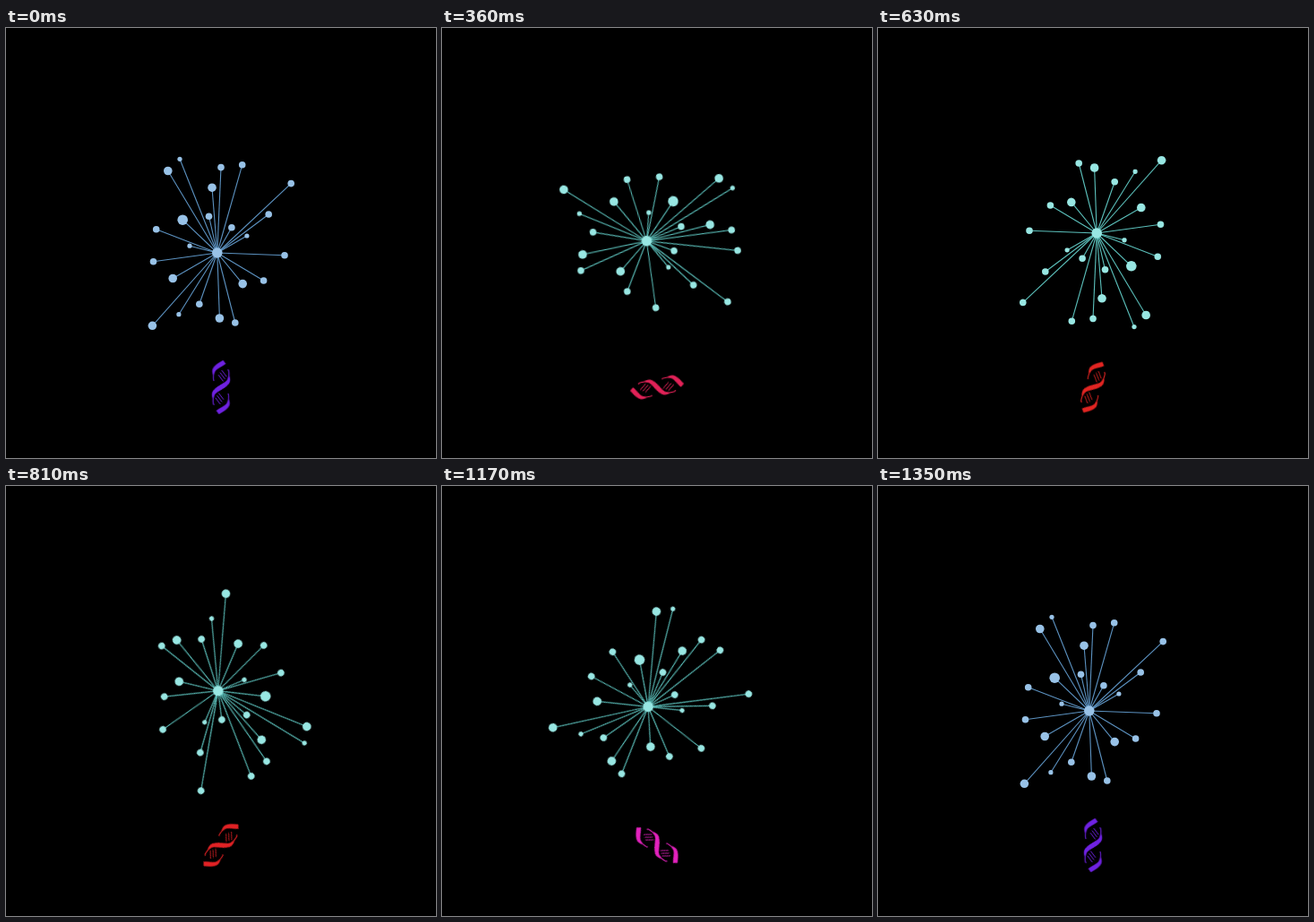
An HTML page that plays this animation: 480 by 480 pixels, repeating every 1440 ms.

```html
<!DOCTYPE html>
<html lang="en">
<head>
<meta charset="utf-8">
<title>Burst and helix</title>
<style>
  html, body { margin: 0; width: 100%; height: 100%; overflow: hidden; background: #000; }
  svg { display: block; width: 100vw; height: 100vh; }
  line { stroke: currentColor; }
  circle, path { fill: currentColor; }
  #burst { transform-origin: 240px 240px; }
  #helix { transform-origin: 240px 401px; }
</style>
</head>
<body>
<svg viewBox="0 0 480 480">
  <g id="burst"><g id="rays"></g><g id="dots"></g></g>
  <g id="helix"><g id="strands" transform="translate(240 401)"></g></g>
</svg>
<script>
const STEP = 90;
const LAST = 7;
const hub = [235.8, 251];

// End points of the rays, grouped by dot size.
const groups = [
  { r: 5.8, points: [[197.2, 214.2]] },
  { r: 4.8, points: [[180.8, 159.5], [230, 178.2], [186.2, 279.5], [264.2, 285.6], [163.4, 332.3], [238.4, 324]] },
  { r: 3.8, points: [[240, 155.6], [263.7, 152.8], [318.2, 173.6], [293.2, 208], [226.5, 210.2], [251.9, 222.8],
    [167.7, 224.7], [164.5, 260.8], [311, 253.7], [287.6, 282], [215.8, 308.3], [255.8, 329]] },
  { r: 2.6, points: [[194, 146.3], [268.9, 232], [205, 243.2], [192.9, 319.7]] }
];

const { burst, rays, dots, helix, strands } = Object.fromEntries(
  [...document.querySelectorAll('g')].map(g => [g.id, g]));

function add(parent, tag, attrs) {
  const el = document.createElementNS('http://www.w3.org/2000/svg', tag);
  for (const key in attrs) el.setAttribute(key, attrs[key]);
  parent.append(el);
}

function addDot([cx, cy], r) {
  add(dots, 'circle', { cx, cy, r });
}

function drawBurst() {
  addDot(hub, 5.8);
  for (const { r, points } of groups) {
    for (const point of points) {
      add(rays, 'line', { x1: hub[0], y1: hub[1], x2: point[0], y2: point[1], 'stroke-width': 1.1 });
      addDot(point, r);
    }
  }
}

// A ribbon that is broad where it crosses in front and tapers toward the back.
function ribbon(from, to, sign) {
  const upper = [], lower = [];
  const samples = 40;
  for (let i = 0; i <= samples; i++) {
    const x = from + (to - from) * i / samples;
    const phase = Math.PI * x / 26;
    const y = sign * 9.8 * (Math.sin(phase) + 0.12 * Math.sin(3 * phase));
    const slope = sign * 1.18 * (Math.cos(phase) + 0.36 * Math.cos(3 * phase));
    const half = 0.1 + 2.2 * Math.max(0, sign * Math.cos(phase));
    const len = Math.hypot(1, slope);
    const nx = -slope / len * half, ny = half / len;
    upper.push(`${(x + nx).toFixed(2)} ${(y + ny).toFixed(2)}`);
    lower.unshift(`${(x - nx).toFixed(2)} ${(y - ny).toFixed(2)}`);
  }
  add(strands, 'path', {
    d: `M${upper.concat(lower).join('L')}Z`,
    stroke: 'currentColor', 'stroke-width': 0.8, 'stroke-linejoin': 'round'
  });
}

function drawHelix() {
  ribbon(-20, 20, 1);
  ribbon(-28, -7, -1);
  ribbon(7, 28, -1);
  for (const side of [-1, 1]) {
    for (const k of [-1, 0, 1]) {
      const x = side * 12.8 + k * 2.6, y = side * 1.5 + k * 1.8;
      add(strands, 'line', { x1: x - 3.6, y1: y + 2.8, x2: x + 3.6, y2: y - 2.8, 'stroke-width': 1 });
    }
  }
}

// Poses run from 0 to LAST and back, each held for one step.
function play(el, look) {
  const count = 2 * (LAST + 1);
  const frames = Array.from({ length: count + 1 }, (_, i) => {
    const pose = Math.max(0, Math.min(i, count - 1 - i));
    return { ...look(pose), offset: i / count, easing: 'step-end' };
  });
  el.animate(frames, { duration: STEP * count, iterations: Infinity });
}

function burstTurn(pose) {
  const u = pose / LAST;
  return 180 * u - 22.4 * Math.sin(Math.PI * u) + 2.1 * Math.sin(2 * Math.PI * u);
}

const helixTurn = pose => 91 - 28.2 * pose + 0.68 * pose ** 2;
const burstHue = pose => Math.max(177, 208 - 18 * pose);
const helixHue = pose => 264 + 97 * (1 - (1 - pose / LAST) ** 2);

drawBurst();
drawHelix();
play(burst, pose => ({ transform: `rotate(${burstTurn(pose)}deg)` }));
play(rays, pose => ({ color: `hsl(${burstHue(pose)}, 45%, 56%)` }));
play(dots, pose => ({ color: `hsl(${burstHue(pose)}, 62%, 75%)` }));
play(helix, pose => ({
  transform: `rotate(${helixTurn(pose)}deg)`,
  color: `hsl(${helixHue(pose)}, 77%, 51%)`
}));
</script>
</body>
</html>
```
